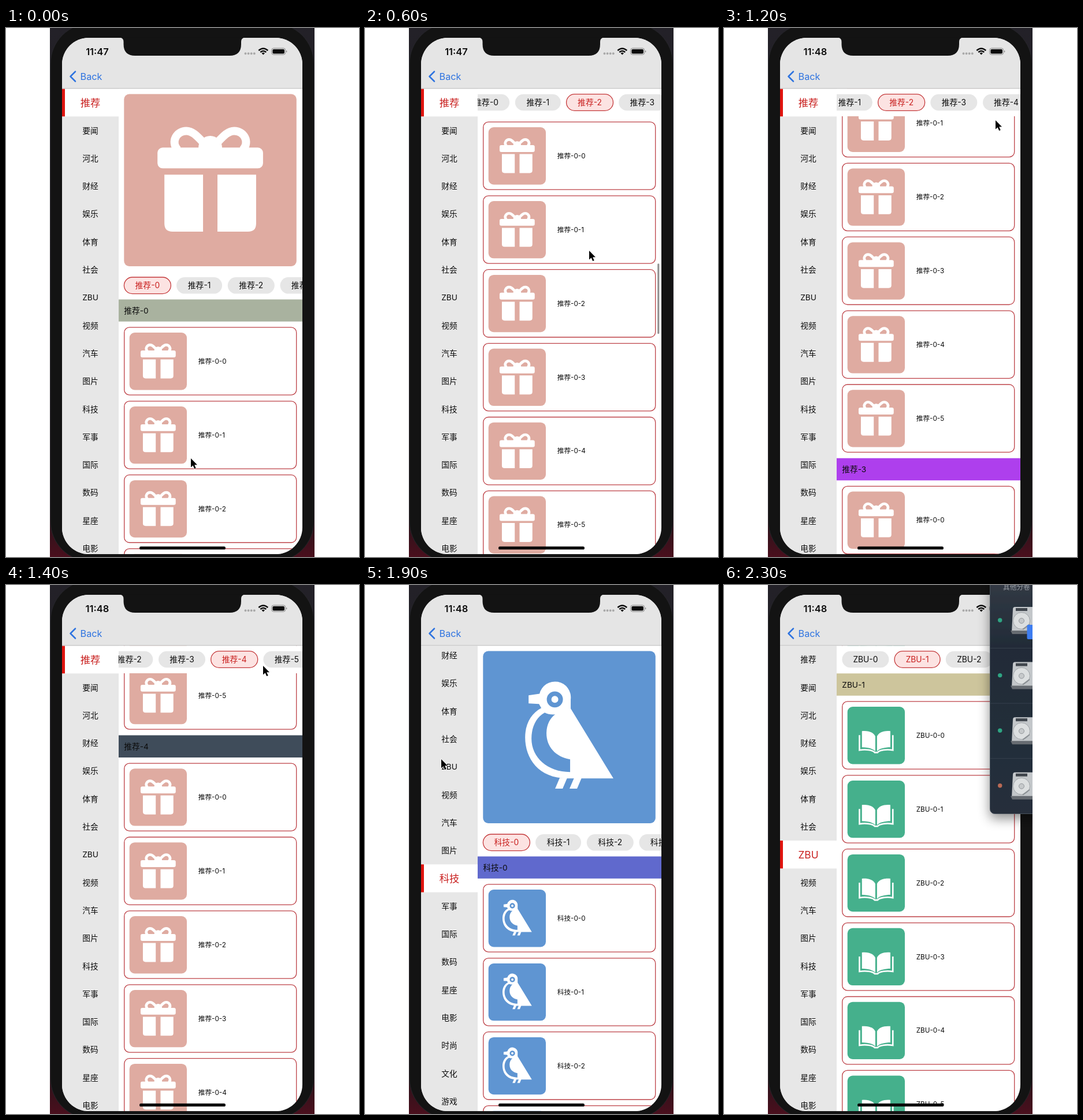
Recreate the animation shown at these times as an HTML page. Size 611 px wide and 917 px high, loop 2.4 s.

```html
<!DOCTYPE html>
<html lang="zh">
<head>
<meta charset="utf-8">
<title>分类列表</title>
<style>
  html, body { margin: 0; width: 100%; height: 100%; overflow: hidden; background: #fff; }
  svg { display: block; }
  text { font-family: Inter, "Noto Sans CJK SC", "Noto Sans CJK", sans-serif; fill: #0c0c0c; }
</style>
</head>
<body>
<svg width="611" height="917" viewBox="0 0 611 917">
  <defs>
    <clipPath id="strip"><rect x="76" width="458" height="917"/></clipPath>
    <clipPath id="screen"><rect x="97" y="17" width="416" height="895" rx="46"/></clipPath>
    <clipPath id="side"><rect x="97" y="105.5" width="98" height="807"/></clipPath>
    <clipPath id="main"><rect x="195" y="105.5" width="318" height="807"/></clipPath>
    <linearGradient id="desk" x2="0" y2="1">
      <stop offset="0" stop-color="#232128"/><stop offset=".9" stop-color="#1c1519"/><stop offset="1" stop-color="#4a0f1d"/>
    </linearGradient>
    <linearGradient id="panel" x2="0" y2="1">
      <stop offset="0" stop-color="#343b46"/><stop offset=".3" stop-color="#222c38"/><stop offset="1" stop-color="#252e3b"/>
    </linearGradient>
    <filter id="shade" x="-60%" y="-10%" width="220%" height="130%">
      <feDropShadow dx="0" dy="8" stdDeviation="10" flood-opacity=".45"/>
    </filter>
    <symbol id="gift" viewBox="0 0 299 299">
      <g fill="#fff">
        <rect x="58" y="93" width="183" height="36" rx="9"/>
        <path id="box" d="M70 140H137V239H84Q70 239 70 225Z"/>
        <use href="#box" transform="matrix(-1 0 0 1 299 0)"/>
        <circle cx="149.5" cy="93" r="20.5"/>
      </g>
      <g fill="none" stroke="#fff" stroke-width="14">
        <path id="loop" d="M93 97C80 82 92 64 108 64C122 64 131 79 150 97"/>
        <use href="#loop" transform="matrix(-1 0 0 1 299 0)"/>
      </g>
    </symbol>
    <symbol id="bird" viewBox="0 0 299 299">
      <path fill="#fff" d="M79 77L98 74A27.5 27.5 0 0 1 152 84V100L226 221H146C96 221 73 186 73 150C73 126 84 108 101 99L97 92L79 91Z"/>
      <path id="leg" fill="#fff" d="M133 220H146L138 239H125Z"/>
      <use href="#leg" x="25"/>
      <path fill="#5f95d2" d="M107 107C92 115 84 132 84 152C84 185 112 210 151 210V188C126 184 110 166 110 143C110 128 116 117 125 110Q115 111 107 107Z"/>
      <circle cx="124.5" cy="84" r="10" fill="#fff" stroke="#5f95d2" stroke-width="8"/>
    </symbol>
    <symbol id="book" viewBox="0 0 99 99">
      <path id="page" fill="#fff" d="M25 42C36 41 45 44 48 51V77C44 72 34 70 25 70Z"/>
      <use href="#page" transform="matrix(-1 0 0 1 99 0)"/>
      <path fill="none" stroke="#fff" stroke-width="2.6" d="M20.7 49V75C32 73 44 75 47 79H52C55 75 67 73 78.3 75V49"/>
    </symbol>
    <g id="drive">
      <path d="M2 44L4 4Q4 0 8 0H40V46H4Z" fill="#c3c7ca"/>
      <path d="M0 41H40V47H3Z" fill="#676c72"/>
      <rect x="9" y="2" width="20" height="5" fill="#40464d"/>
      <circle cx="19" cy="24" r="14.5" fill="#dcdfe0" stroke="#9da2a6"/>
      <circle cx="19" cy="24" r="4.5" fill="#c6c9cb" stroke="#92979b"/>
      <path d="M21 39L33 30" stroke="#8b9094" stroke-width="2"/>
    </g>
  </defs>
  <g clip-path="url(#strip)">
    <rect x="76" width="458" height="917" fill="url(#desk)"/>
    <rect x="77" y="-8" width="456" height="933" rx="70" fill="#131313" stroke="#26262a"/>
    <g clip-path="url(#screen)">
      <rect x="97" y="17" width="416" height="895" fill="#fff"/>
      <g id="view"></g>
      <rect x="97" y="17" width="416" height="88" fill="#e5e5e5"/>
      <rect x="97" y="104.3" width="416" height="1" fill="#bcbcbc"/>
      <path d="M120 75.5L111.5 84L120 92.5" fill="none" stroke="#2f74e0" stroke-width="2.5" stroke-linecap="round" stroke-linejoin="round"/>
      <text x="128.5" y="89.8" font-size="16.3" style="fill:#2f74e0">Back</text>
      <text id="clock" x="158" y="46.5" font-size="16.5" font-weight="600" text-anchor="middle"></text>
      <path d="M414.5 44.2H430" stroke="#a9a9a9" stroke-width="4" stroke-linecap="round" stroke-dasharray="0 5.1"/>
      <g transform="translate(445.3 46)" fill="none" stroke="#0c0c0c" stroke-width="2.5">
        <path d="M-8-7Q0-14 8-7M-5-4Q0-8.500 5-4"/>
        <path d="M0 .5L-2.700-2.300Q0-4.500 2.700-2.300Z" fill="#0c0c0c" stroke="none"/>
      </g>
      <rect x="459.7" y="35" width="24" height="11.2" rx="3.5" fill="none" stroke="#888"/>
      <rect x="461.4" y="36.7" width="20.6" height="7.8" rx="2" fill="#0c0c0c"/>
      <path d="M485 38.7Q488 40.6 485 42.5Z" fill="#888"/>
    </g>
    <path d="M197 16.5Q203.500 17 203.500 24V28Q203.500 48 223.500 48H387Q407 48 407 28V24Q407 17 413.500 16.5Z" fill="#131313"/>
    <rect x="231" y="898.7" width="149" height="5.3" rx="2.6" fill="#080808"/>
    <g id="overlay"></g>
  </g>
  <path id="arrow" d="M0 0V15.5L3.6 12.2L6.2 18L8.7 17L6.2 11.3H11Z" stroke="#fff" stroke-width="1.2" paint-order="stroke"/>
</svg>
<script>
const LOOP = 2400, STEP = 100, CARD = 127.9, SECTION = 815.8, ITEM = 48.3;
const names = '推荐 要闻 河北 财经 娱乐 体育 社会 ZBU 视频 汽车 图片 科技 军事 国际 数码 星座 电影 时尚 文化 游戏'.split(' ');
const themes = {
  0: { icon: 'gift', fill: '#dfaba1', heads: ['#a9b29f', '#a26bc4', '#7fa6b8', '#ae3fed', '#3f4c5a', '#b9a06c'] },
  11: { icon: 'bird', fill: '#5f95d2', heads: ['#6069cd', '#8fb08a'] },
  7: { icon: 'book', fill: '#45b08c', heads: ['#92a8bd', '#cdc59c'] }
};

// A track is a run of "step:value" keys, held or eased linearly between keys.
function track(keys, held) {
  const list = keys.split(' ').map(k => k.split(':').map(Number));
  return n => {
    const i = list.findLastIndex(k => k[0] <= n);
    const [a, v] = list[i], next = list[i + 1];
    return held || !next ? v : v + (next[1] - v) * (n - a) / (next[0] - a);
  };
}
const scrollAt = track('0:0 2:405 4:1420 5:1420 6:1987.6 8:2172 13:2172 14:3473 15:3580 17:3580 18:0 21:0 23:1132.8');
const tabsAt = track('0:0 5:0 7:70.5 11:70.5 14:210.5 15:252 17:252 18:0');
const sideAt = track('0:0 17:0 18:90 19:152 21:0');
const activeAt = track('0:0 4:1 6:2 14:4 18:0 22:1', true);
const groupAt = track('0:0 18:11 20:7', true);
const pointerX = track('0:320 2:337 4:380 5:380 6:388 8:383 11:383 12:470 14:445 17:145 19:132 20:134 22:334 23:-50');
const pointerY = track('0:746 2:322 4:480 5:480 6:386 8:362 11:362 12:160 14:140 17:650 19:302 20:312 22:446 23:-50');

const el = id => document.getElementById(id);
const rect = (x, y, w, h, fill, more = '') =>
  `<rect x="${x}" y="${y}" width="${w}" height="${h}" fill="${fill}" ${more}/>`;
const label = (s, x, y, size, color = '#0c0c0c', anchor = 'start') =>
  `<text x="${x}" y="${y + size * .37}" font-size="${size}" text-anchor="${anchor}" style="fill:${color}">${s}</text>`;
const picture = (t, x, y, size) => rect(x, y, size, size, t.fill, 'rx="9"') +
  `<use href="#${t.icon}" x="${x}" y="${y}" width="${size}" height="${size}"/>`;

function sideBar(group, scroll) {
  let out = rect(97, 105, 98, 807, '#e7e7e7');
  names.forEach((name, i) => {
    const y = 105 + i * ITEM - scroll, on = i === group;
    if (on) out += rect(97, y, 98, ITEM, '#fff') + rect(97, y, 5, ITEM, '#e0150f');
    out += label(name, 146, y + 24.2, on ? 17.3 : 13.7, on ? '#c9201f' : undefined, 'middle');
  });
  return out;
}

function tabBar(name, y, scroll, active) {
  let out = rect(195, y, 318, 48, '#fff'), x = 204.4 - scroll;
  for (let i = 0; i < 6; i++) {
    const w = i === 1 ? 79 : 81, on = i === active;
    out += rect(x, y + 9.7, w, 28.6, on ? '#fce3e2' : '#e6e6e6', `rx="14.3" ${on ? 'stroke="#c4393b" stroke-width="1.3"' : ''}`);
    out += label(`${name}-${i}`, x + w / 2, y + 24, 13.8, on ? '#c9201f' : undefined, 'middle');
    x += w + 9.7;
  }
  return out;
}

function cards(group, scroll) {
  const t = themes[group], name = names[group];
  let out = picture(t, 204.3, 114.5 - scroll, 298.5);
  for (let s = 0; s < 6; s++) {
    const top = 470.3 + s * SECTION - scroll;
    if (top > 917 || top + SECTION < 105) continue;
    out += rect(195, top, 318, 38.5, t.heads[s % t.heads.length]) + label(`${name}-${s}`, 204.3, top + 19.3, 13.7);
    for (let c = 0; c < 6; c++) {
      const y = top + 48.6 + c * CARD;
      out += rect(204.7, y, 298, 117.3, '#fff', 'rx="9" stroke="#bd4147" stroke-width="1.3"');
      out += picture(t, 213.7, y + 9.2, 99.3) + label(`${name}-0-${c}`, 332.7, y + 58.6, 11.7);
    }
  }
  return out;
}

function panel() {
  let out = rect(460.5, -20, 110, 416.5, 'url(#panel)', 'rx="8" stroke="#4a525d" filter="url(#shade)"');
  out += label('其他分卷', 483, 3.5, 11.7, '#9da3aa');
  for (let i = 0; i < 4; i++) {
    const y = 61 + i * 95.6;
    out += `<circle cx="477.7" cy="${y}" r="3.7" fill="${i < 3 ? '#2fa583' : '#b96a55'}"/>`;
    out += `<use href="#drive" x="496" y="${y - 23}"/>`;
    if (i < 3) out += rect(461, y + 48, 73, 1, '#35404c');
  }
  return out + rect(524.5, 69, 20, 25, '#3d7df0', 'rx="2"');
}

function render(n) {
  const scroll = scrollAt(n), group = groupAt(n);
  const tabsY = Math.max(105, 422.3 - scroll);
  const bar = n >= 1 && n < 12 ? rect(506.3, 108 + scroll * .151, 3, 122, '#8e8e8e', 'rx="1.5"') : '';
  el('view').innerHTML =
    `<g clip-path="url(#side)">${sideBar(group, sideAt(n))}</g>` +
    `<g clip-path="url(#main)">${cards(group, scroll)}${tabBar(names[group], tabsY, tabsAt(n), activeAt(n))}${bar}</g>`;
  el('clock').textContent = n < 12 ? '11:47' : '11:48';
  el('overlay').innerHTML = n >= 23 ? panel() : '';
  el('arrow').setAttribute('transform', `translate(${pointerX(n)} ${pointerY(n)})`);
}

let shown;
const start = performance.now();
function tick(now) {
  const n = Math.floor(Math.max(0, now - start) % LOOP / STEP);
  if (n !== shown) render(shown = n);
  requestAnimationFrame(tick);
}
tick(start);
</script>
</body>
</html>
```
